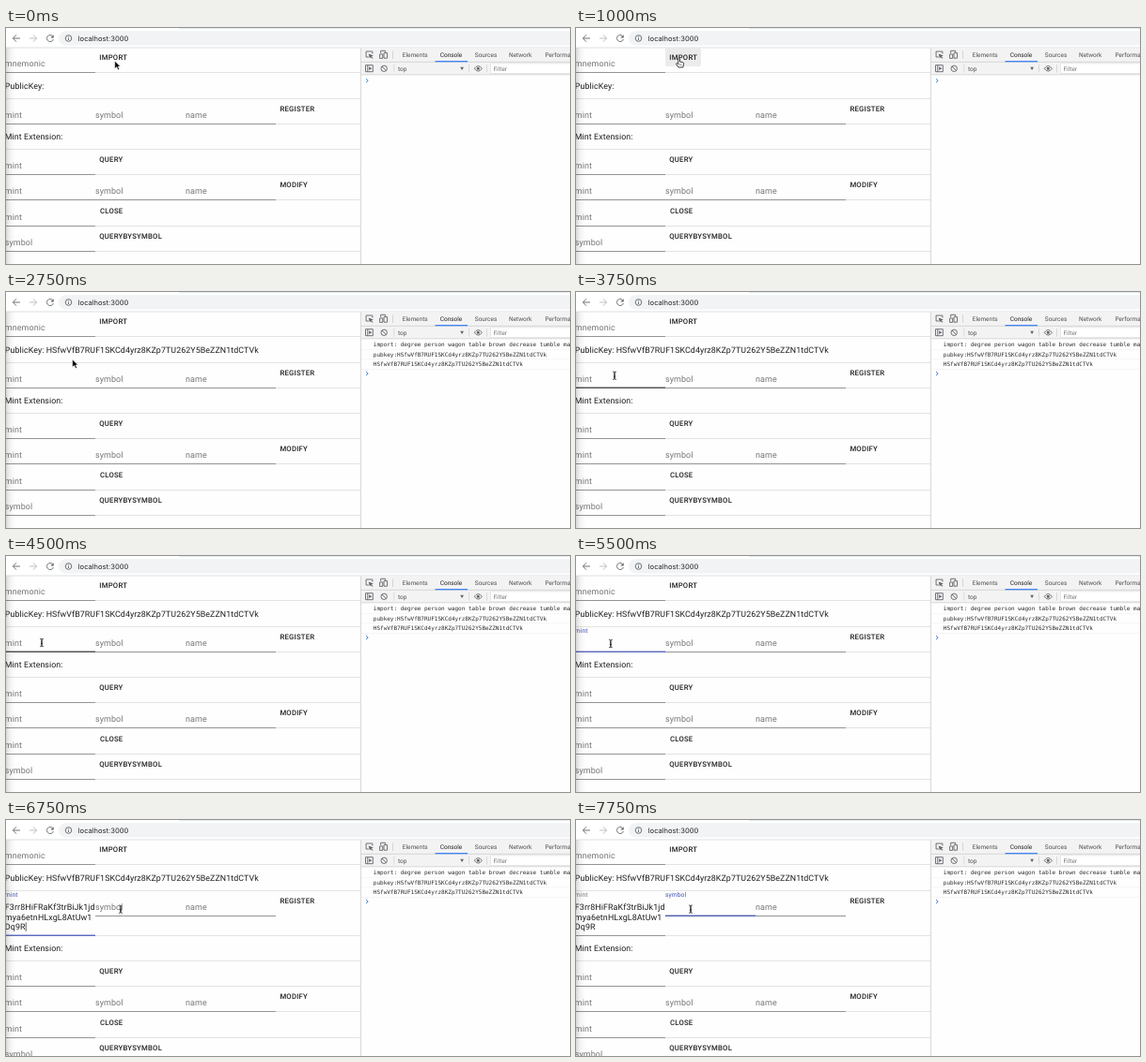
These frames come from a looping animation (600x252 px, 8000 ms). An HTML page:

```html
<!DOCTYPE html>
<html lang="en">
<head>
<meta charset="utf-8">
<title>Token console</title>
<style>
  html, body { margin: 0; width: 100%; height: 100%; overflow: hidden; background: #fefefe; }
  svg { display: block; width: 600px; height: 252px; }
  text { font-family: Roboto, sans-serif; text-rendering: geometricPrecision; white-space: pre; }
  .body { font-size: 8.85px; letter-spacing: .00938em; fill: #1d1d1d; }
  .label, .value { font-size: 8.95px; letter-spacing: .00938em; fill: #757575; }
  .value { fill: #1d1d1d; }
  .btn { font-size: 7.72px; font-weight: 500; letter-spacing: .02857em; fill: #212121; }
  .url { font: 7.56px Inter, sans-serif; fill: #26282b; }
  .tool { font-size: 6.5px; fill: #4c4f53; }
  .log { font: 6px "DejaVu Sans Mono", monospace; fill: #2b2b2b; }
  .icon { fill: none; stroke: #5f6368; stroke-width: .9; }
</style>
</head>
<body>
<svg id="stage" viewBox="0 0 600 252">
  <defs>
    <linearGradient id="shade">
      <stop offset="0" stop-opacity=".15"/>
      <stop offset=".4" stop-opacity=".05"/>
      <stop offset="1" stop-opacity="0"/>
    </linearGradient>
    <path id="ibeam" d="M-1.8 -4.2Q0 -4.2 0 -3V3Q0 4.2 -1.8 4.2M1.8 -4.2Q0 -4.2 0 -3V3Q0 4.2 1.8 4.2M-1 .9H1"/>
  </defs>
  <rect width="600" height="252" fill="#fefefe"/>
  <g id="page">
    <rect id="hover" x="95" y="21.5" width="38" height="19.5" rx="2" fill="#ebebeb"/>
    <g id="top"></g>
    <g id="lower"></g>
    <g id="field"></g>
    <rect y="21" width="10" height="231" fill="url(#shade)"/>
  </g>

  <g id="browser">
    <rect width="600" height="21" fill="#fff"/>
    <rect x="184" width="416" height=".8" fill="#dee1e6"/>
    <rect x="56" y="3.3" width="570" height="15.2" rx="7.6" fill="#f1f3f4"/>
    <path d="M0 21H600" stroke="#d4d6d8" stroke-width=".8"/>
    <path class="icon" d="M15 11H7.6M11 7.3L7.4 11L11 14.7"/>
    <path class="icon" style="stroke:#b5b8bb" d="M25 11H32.4M29 7.3L32.6 11L29 14.7"/>
    <path class="icon" d="M49.6 8.6A3.5 3.5 0 1 0 50.4 12"/>
    <path d="M50.7 7.2V10.6H47.3Z" fill="#5f6368"/>
    <circle class="icon" cx="66.5" cy="11" r="3.3"/>
    <path class="icon" d="M66.5 10.5V13M66.5 8.8V9.6"/>
    <text class="url" x="76.8" y="13.7">localhost:3000</text>
  </g>

  <g id="tools">
    <rect x="377.5" y="21.4" width="222.5" height="28.4" fill="#f3f3f3"/>
    <rect x="377.5" y="49.8" width="222.5" height="202.2" fill="#fefefe"/>
    <path d="M377.5 21.4V252M377.5 36.3H600M377.5 49.8H600M411.5 24.5V33" fill="none" stroke="#cfcfcf" stroke-width=".8"/>
    <path d="M412.8 39V47.5M492.5 39V47.5M511.5 39V47.5" stroke="#cfcfcf" stroke-width=".7"/>
    <path class="icon" d="M385.9 31H383.1V25H389.9V27.5"/>
    <path d="M385.7 27.4L390.8 29.4L388.7 30.2L390.4 32L389.6 32.7L388 30.9L387 32.6Z" fill="#5f6368"/>
    <path class="icon" d="M398.7 27V24.3H403.7V26M400.7 32.4H397.6V28H400.7ZM402 26.6H405.5V32.2H402Z"/>
    <path class="icon" d="M382.5 39.7H390.3V46.7H382.5ZM384.8 39.7V46.7"/>
    <path d="M386.2 41.3L389.2 43.2L386.2 45.1Z" fill="#5f6368"/>
    <circle class="icon" cx="402.2" cy="43.3" r="3.2"/>
    <path class="icon" d="M400 41L404.4 45.6"/>
    <path d="M483.2 41.8H487L485.1 45Z" fill="#5f6368"/>
    <path class="icon" d="M498.2 43.3Q502.3 37.8 506.4 43.3Q502.3 48.8 498.2 43.3Z"/>
    <circle cx="502.3" cy="43.3" r="1.5" fill="#5f6368"/>
    <rect x="515.5" y="37.9" width="90" height="10.4" fill="#fff" stroke="#dcdcdc" stroke-width=".6"/>
    <rect x="456.5" y="35" width="34.5" height="1.3" fill="#4285f4"/>
    <text class="tool" x="417" y="45.6">top</text>
    <text class="tool" x="518.5" y="45.6" style="fill:#757575">Filter</text>
  </g>
  <g id="logs"></g>
  <path id="prompt" d="M383 -1.9L385.2 0L383 1.9" fill="none" stroke="#3b7de0"/>

  <g id="arrow">
    <path d="M0 0V8.2L2 6.4L3.4 9.6L4.9 8.9L3.5 5.9H6Z" stroke="#fff" stroke-width=".6"/>
  </g>
  <g id="hand">
    <path d="M-.8 .8Q0 -.5 .8 .8V4L4 4.7Q5.2 5 5 6.3L4.3 10H-.6L-3 6.6Q-3.2 5.4 -2 5.6L-.8 6.7Z" fill="#fff" stroke="#111" stroke-width=".8"/>
    <path d="M1 6.3V8.3M2.5 6.4V8.3" stroke="#333" stroke-width=".5"/>
  </g>
  <g id="beam" fill="none">
    <use href="#ibeam" stroke="#fff" stroke-width="2"/>
    <use href="#ibeam" stroke="#222" stroke-width=".9"/>
  </g>
</svg>
<script>
const LOOP = 8000, STEP = 250;
const BLUE = '#3f51b5', GREY = '#757575', LINE = '#949494';
const KEY = 'HSfwVfB7RUF1SKCd4yrz8KZp7TU262Y5BeZZN1tdCTVk';
const MINT = ['F3rr8HiFRaKf3trBiJk1jd', 'mya6etnHLxgL8AtUw1', 'Dq9R'];
const LEFT = -1.2, COLS = [LEFT, 95, 191];
const FIELD = 102, GROW = 21;
const $ = id => document.getElementById(id);

function add(parent, tag, attrs, content) {
  const el = document.createElementNS('http://www.w3.org/2000/svg', tag);
  for (const k in attrs) el.setAttribute(k, attrs[k]);
  if (content) el.textContent = content;
  return $(parent).appendChild(el);
}
const set = (el, attrs) => { for (const k in attrs) el.setAttribute(k, attrs[k]); };
const show = (el, on) => el.setAttribute('visibility', on ? 'visible' : 'hidden');
const text = (parent, cls, x, y, s) => add(parent, 'text', { class: cls, x, y }, s);
const bar = (parent, x, y, width, height, fill) => add(parent, 'rect', { x, y, width, height, fill });
const divider = (parent, y) => bar(parent, 0, y, 377, 1, '#e3e3e3');

// One form row: divider, labels with underlines, button; returns the divider
function row(parent, y, labels, button, x = 99.3) {
  const line = divider(parent, y);
  labels.forEach((s, i) => {
    if (!s) return;
    text(parent, 'label', COLS[i], y - 5.7, s);
    bar(parent, i * 96 - (i ? 1 : 0), y, i ? 96 : 95, 1, LINE);
  });
  text(parent, 'btn', x, y - 13.4, button);
  return line;
}

row('top', 47, ['mnemonic'], 'IMPORT');
const pub = text('top', 'body', LEFT, 65.2, 'PublicKey:');
divider('top', 75);
const registerLine = row('top', FIELD, ['', '', 'name'], 'REGISTER', 291.4);

text('lower', 'body', LEFT, 119.4, 'Mint Extension:');
divider('lower', 129);
row('lower', 156, ['mint'], 'QUERY');
row('lower', 183, ['mint', 'symbol', 'name'], 'MODIFY', 291.4);
row('lower', 211, ['mint'], 'CLOSE', 100);
row('lower', 238, ['symbol'], 'QUERYBYSYMBOL');

const mintLine = bar('field', 0, FIELD, 95, 1, LINE);
bar('field', 95, FIELD, 96, 1, LINE);
const symbolFocus = bar('field', 95, FIELD - .4, 96, 1.2, BLUE);
const mintLabel = text('field', 'label', LEFT, 0, 'mint');
const symbolLabel = text('field', 'label', 95, 0, 'symbol');
const typed = MINT.map((s, i) => text('field', 'value', LEFT, 96.4 + i * 10.4, s));
const caret = bar('field', 0, 0, .7, 9.5, '#222');

['Elements', 'Console', 'Sources', 'Network', 'Performance'].forEach((s, i) => {
  const tab = text('tools', 'tool', [421.7, 461.7, 498.8, 535, 573.5][i], 30.8, s);
  if (i === 1) tab.style.fill = '#222';
});
['import: degree person wagon table brown decrease tumble ma', 'pubkey:' + KEY, KEY].forEach((s, i) => {
  text('logs', 'log', 390.8, 58.4 + i * 10.35, s);
  bar('logs', 378, 61.3 + i * 10.35, 222, .5, '#ececec');
});

// time, x, y, pointer shape
const PATH = [
  [0, 115.7, 35.2, 'arrow'], [250, 113, 34, 'hand'], [1000, 109.6, 32, 'hand'],
  [1750, 109.6, 32, 'hand'], [2000, 100, 46, 'arrow'], [2500, 75, 70.5, 'arrow'],
  [2750, 70.6, 72, 'arrow'], [3250, 54, 79, 'arrow'], [3500, 46, 85, 'beam'],
  [3750, 41, 89.2, 'beam'], [4750, 37, 93.6, 'beam'], [6250, 36.8, 93.6, 'beam'],
  [6500, 60, 94, 'beam'], [6750, 122, 95.2, 'beam'], [8000, 122, 95.2, 'beam']
];

function pointer(t) {
  let i = 0;
  while (PATH[i + 1][0] <= t) i++;
  const [t0, x0, y0, shape] = PATH[i], [t1, x1, y1] = PATH[i + 1];
  const k = (t - t0) / (t1 - t0);
  for (const id of ['arrow', 'hand', 'beam']) show($(id), id === shape);
  $(shape).setAttribute('transform', `translate(${x0 + (x1 - x0) * k} ${y0 + (y1 - y0) * k})`);
}

// k: 0 resting inside the field, 1 floated above it
function float(label, k, color) {
  label.style.fontSize = 8.95 * (1 - .25 * k) + 'px';
  label.style.fill = color;
  label.setAttribute('y', FIELD - 5.7 - 14.1 * k);
}

function draw(now) {
  const t = Math.floor(now % LOOP / STEP) * STEP;
  const loaded = t >= 1500, pasted = t >= 5750;
  const inMint = t >= 5500 && t < 7250, inSymbol = t >= 7250;
  const over = t >= 3500 && t < 5500;
  const dy = pasted ? GROW : 0;

  show($('hover'), t >= 250 && t < 2000);
  pub.textContent = 'PublicKey:' + (loaded ? ' ' + KEY : '');
  show($('logs'), loaded);
  $('prompt').setAttribute('transform', `translate(0 ${loaded ? 87.2 : 56.3})`);

  $('lower').setAttribute('transform', `translate(0 ${dy})`);
  registerLine.setAttribute('y', FIELD + dy);
  const thick = inMint || over;
  set(mintLine, {
    y: FIELD + dy - (thick ? .4 : 0), height: thick ? 1.2 : 1,
    fill: inMint ? BLUE : over ? '#303030' : LINE
  });
  float(mintLabel, t >= 5500 ? 1 : 0, inMint ? BLUE : GREY);
  typed.forEach(el => show(el, pasted));

  const k = inSymbol ? (t === 7250 ? .7 : 1) : 0;
  float(symbolLabel, k, inSymbol ? BLUE : GREY);
  set(symbolFocus, { x: 143 - 48 * k, width: 96 * k });

  show(caret, t === 7500 || (inMint && pasted && (t - 5750) % 1000 < 500));
  set(caret, inSymbol ? { x: 95.2, y: 88.8 } : { x: 20.8, y: 109.4 });
  pointer(t);
}

const start = performance.now();
function tick() {
  draw(performance.now() - start);
  requestAnimationFrame(tick);
}
tick();
</script>
</body>
</html>
```
